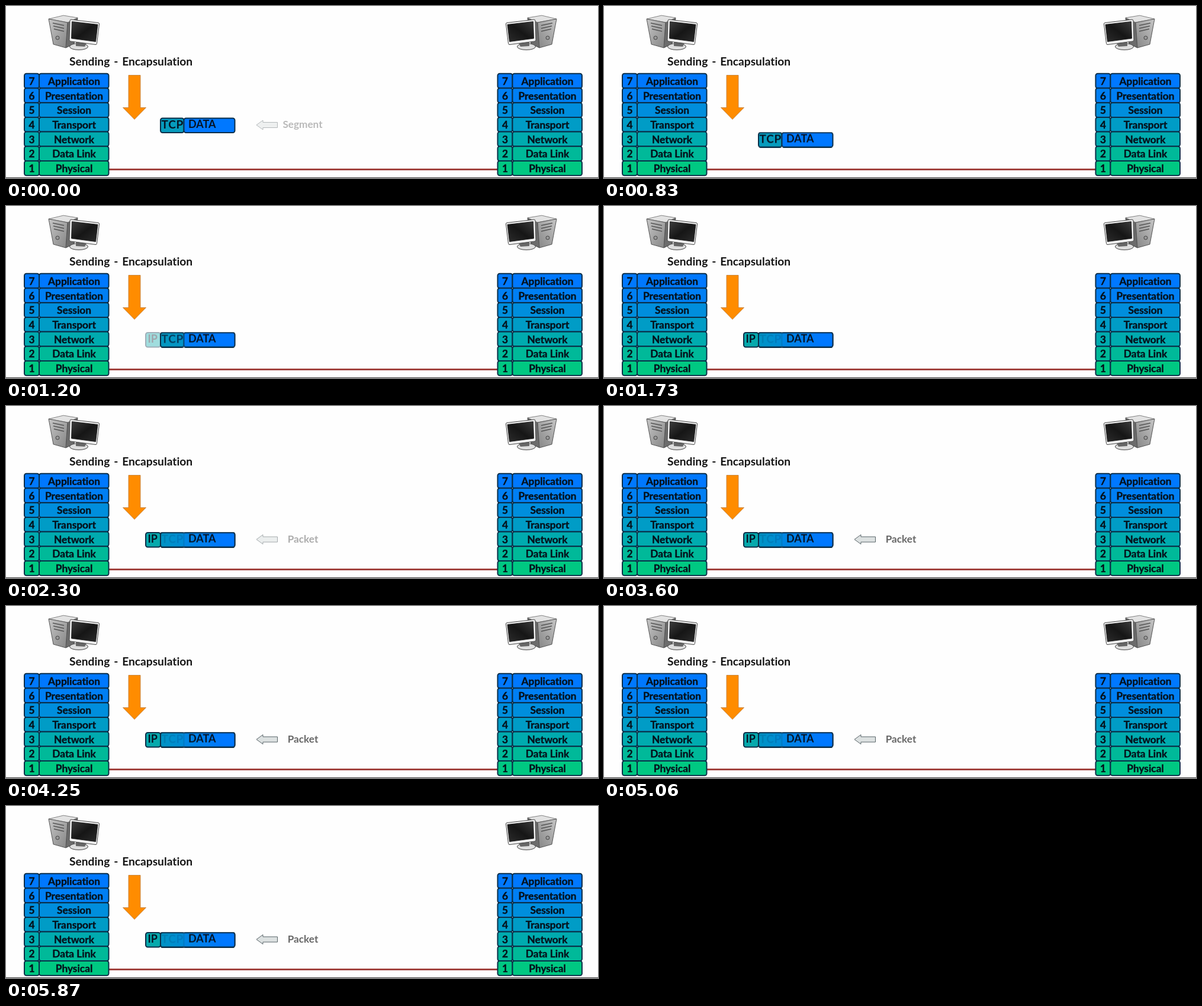
An HTML page that plays this animation: 1000x292 px, repeating every 5.97 s.

```html
<!DOCTYPE html>
<html lang="en">
<head>
<meta charset="utf-8">
<title>Encapsulation</title>
<style>
  html, body { margin: 0; width: 100%; height: 100%; overflow: hidden; background: #fefefe; }
  svg { display: block; width: 100vw; height: 100vh; }
  text { font-family: Lato, "Open Sans", sans-serif; font-weight: 700; font-variant-ligatures: none; fill: #141414; }
  .title { font-size: 19.2px; word-spacing: 2.2px; }
  .layer { font-size: 17.3px; text-anchor: middle; fill: #06121c; stroke: #06121c; stroke-width: .4; }
  .chip { font-size: 18px; fill: #061426; }
  .tcp { font-size: 19px; letter-spacing: .7px; }
  .note { font-size: 17.2px; text-anchor: middle; fill: #666; }
  .cell { stroke: #0a2e48; stroke-width: 2; }
  .segment, .packet, .merged, .ip, .data { animation: 5970ms linear infinite; }
  .segment { animation-name: segment; }
  .data { animation-name: drop; animation-timing-function: ease-in-out; }
  .merged { animation-name: merge; }
  .ip { animation-name: ip; }
  .packet { animation-name: packet; }
  @keyframes segment { 0%, 2.2% { opacity: .45 } 7.2%, 100% { opacity: 0 } }
  @keyframes drop { 0%, 5.5% { transform: translateY(0) } 12.2%, 100% { transform: translateY(24.5px) } }
  @keyframes ip { 0%, 16.8% { opacity: 0 } 25.6%, 100% { opacity: 1 } }
  @keyframes merge { 0%, 16.8% { opacity: 0 } 25.6%, 100% { opacity: .87 } }
  @keyframes packet { 0%, 34% { opacity: 0 } 42.4%, 100% { opacity: 1 } }
</style>
</head>
<body>
<svg viewBox="0 0 1000 292" preserveAspectRatio="none">
  <defs>
    <linearGradient id="blend">
      <stop offset="0" stop-color="#0093c6"/>
      <stop offset=".85" stop-color="#0078ff"/>
    </linearGradient>
    <linearGradient id="front" x2="1" y2="1">
      <stop offset="0" stop-color="#c6c6c6"/>
      <stop offset="1" stop-color="#858585"/>
    </linearGradient>
    <linearGradient id="glass" x2="1" y2="1">
      <stop offset="0" stop-color="#3c3c3c"/>
      <stop offset=".5" stop-color="#161616"/>
      <stop offset="1" stop-color="#2b2b2b"/>
    </linearGradient>
    <g id="pc" stroke-linejoin="round">
      <path d="M104 28 121 20 115 64 101 71Z" fill="#6c6c6c" stroke="#444"/>
      <path d="M72 22 97 16 121 20 104 28Z" fill="#e2e2e2" stroke="#666" stroke-width=".8"/>
      <path d="M72 22 104 28 101 71 80 65Z" fill="url(#front)" stroke="#555"/>
      <path d="M79 29 98 33M80 34 98 38M81 39 98 43" stroke="#555" stroke-width="1.600"/>
      <circle cx="87" cy="54" r="3" fill="#999" stroke="#444"/>
      <ellipse cx="123" cy="69" rx="15.500" ry="5.500" fill="#dedede" stroke="#444"/>
      <path d="M118 60 136 63 133 69 118 68Z" fill="#666"/>
      <path d="M110 23 156 28.500Q158 29 157.500 31L153.500 63.500Q153 66 151 65.500L109 60Q107 59.500 107 57.500L108 25Q108 23 110 23Z" fill="#f2f2f2" stroke="#444"/>
      <path d="M111.500 26.500 155 31.500 151.500 60.500 110.500 55Z" fill="url(#glass)" stroke="#111" stroke-width=".8"/>
    </g>
    <path id="pointer" d="M423 0 434-8V-4.500H458.500V4.500H434V8Z" fill="#dce1e1" stroke="#596468"/>
    <g id="stack"></g>
  </defs>

  <rect width="1000" height="292" fill="#fefefe"/>
  <path d="M0 291.500H1000" stroke="#3c3c3c"/>
  <path d="M174 277.400H831" stroke="#a2433f" stroke-width="3"/>
  <use href="#pc"/>
  <use href="#pc" transform="matrix(-1 0 0 1 1002 0)"/>
  <use href="#stack"/>
  <use href="#stack" x="799.500"/>

  <text class="title" x="107" y="101">Sending - Encapsulation</text>
  <path d="M207 117.500H227V172.500H236.500L217 192.500 197.500 172.500H207Z" fill="#ff8c00" stroke="#bd7a35" stroke-width=".8"/>

  <g class="data">
    <rect class="cell" x="261" y="190.500" width="39.500" height="24.500" rx="3.500" fill="#069bbd"/>
    <rect class="cell" x="300.500" y="190.500" width="86" height="24.500" rx="3.500" fill="#0078ff"/>
    <text class="chip tcp" x="262.500" y="208">TCP</text>
    <rect class="cell merged" x="261" y="190.500" width="125.500" height="24.500" rx="3.500" fill="url(#blend)"/>
    <text class="chip" x="308" y="206.800">DATA</text>
  </g>
  <g class="ip">
    <rect class="cell" x="236" y="215" width="25" height="24.500" rx="3.500" fill="#06a9ac"/>
    <text class="chip" x="239.500" y="232">IP</text>
  </g>

  <g class="segment">
    <use href="#pointer" y="202"/>
    <text class="note" x="501" y="207">Segment</text>
  </g>
  <g class="packet">
    <use href="#pointer" y="226.500"/>
    <text class="note" x="501.500" y="231.500">Packet</text>
  </g>
</svg>
<script>
  const layers = ["Application", "Presentation", "Session", "Transport", "Network", "Data Link", "Physical"];
  const topColor = [0, 120, 255], bottomColor = [0, 200, 130];
  const pitch = 24.7;

  function row(name, i) {
    const y = 114.8 + i * pitch;
    const k = Math.max(0, i - 0.5) / 5.5;
    const fill = `rgb(${topColor.map((c, j) => Math.round(c + (bottomColor[j] - c) * k))})`;
    const cell = (x, w) =>
      `<rect class="cell" x="${x}" y="${y}" width="${w}" height="${pitch}" rx="3.5" fill="${fill}"/>`;
    const label = (x, s) => `<text class="layer" x="${x}" y="${y + 19}">${s}</text>`;
    return cell(31, 25) + cell(56, 117.5) + label(43.5, 7 - i) + label(115, name);
  }

  document.getElementById("stack").innerHTML = layers.map(row).join("");
</script>
</body>
</html>
```
